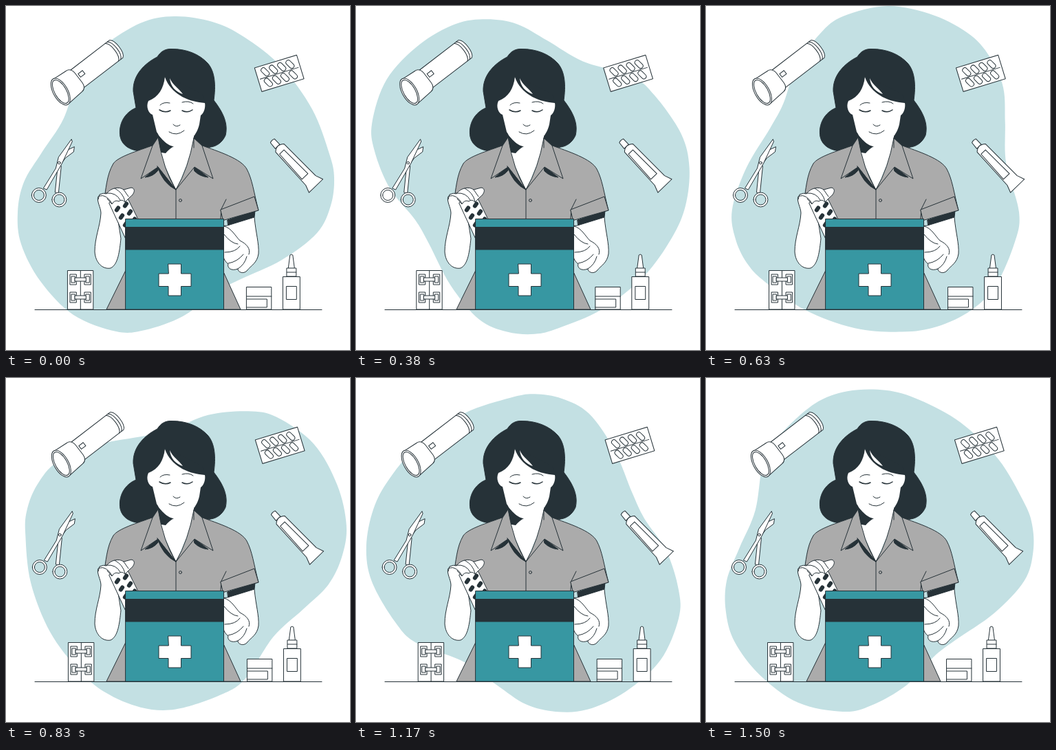
Recreate the animation shown at these times as an HTML page. Size 500 px wide and 500 px high, loop 1.54 s.

```html
<!DOCTYPE html>
<html lang="en">
<head>
<meta charset="utf-8">
<title>First aid kit</title>
<style>
  html, body { margin: 0; width: 100%; height: 100%; overflow: hidden; background: #fff; }
  svg { display: block; width: 100vw; height: 100vh; }
  .ink { fill: #fff; stroke: #263238; stroke-width: 1; stroke-linejoin: round; stroke-linecap: round; }
  .line { fill: none; }
  .dark { fill: #263238; }
  .gray { fill: #ababab; }
  .teal { fill: #3797a2; }
</style>
</head>
<body>
<svg viewBox="0 0 500 500">
  <path id="blob" fill="#c3e0e3"/>

  <g id="items" class="ink">
    <!-- flashlight -->
    <g transform="translate(79 124.500) rotate(-37.500)">
      <path d="M28-16H102C109-12 109 12 102 16H28Z"/>
      <path class="line" d="M94-16C101-11 101 11 94 16M98-16C105-11 105 11 98 16"/>
      <rect x="36" y="-5" width="8" height="6"/>
      <path d="M0-21L25-19C30-19 33-14 33-9V9C33 14 30 19 25 19L0 21Z"/>
      <g transform="rotate(8)">
        <ellipse rx="10.5" ry="21.5"/>
        <ellipse rx="8.5" ry="19"/>
      </g>
    </g>
    <!-- capsules -->
    <g transform="translate(361 90) rotate(-17)">
      <rect width="64" height="36"/>
      <path class="line" d="M3 18H61"/>
      <g id="capsules"></g>
    </g>
    <!-- tube -->
    <g transform="translate(387 196) rotate(46)">
      <path d="M11-4L0-4Q-2 0 0 4L11 5Z"/>
      <path d="M15-9L80-10L91-14V14L80 10L15 8Q7 0 15-9Z"/>
      <path class="line" d="M21-3L70-4V8L21 6Z"/>
    </g>
    <!-- scissors -->
    <path d="M75 232L71 271L76 272L80 233Z"/>
    <path d="M99 205L98 212L86 221L81 228L77 225L88 210Z"/>
    <path d="M95 194L96 197L81 229L59 267L54 265L72 236L76 220Z"/>
    <circle cx="77" cy="228" r="1.8"/>
    <g id="rings" fill-rule="evenodd"></g>
    <!-- box -->
    <path d="M89.5 384.5H126.500V441H89.500ZM108 384.500V441"/>
    <g id="clasps"></g>
    <!-- jar -->
    <path d="M349.500 408.500H385.500V441H349.500ZM349.500 422H385.500M349.500 426H379V438H349.500"/>
    <!-- dropper bottle -->
    <path d="M410 381L412.500 362Q414.500 360 416.500 362L419 381Z"/>
    <path d="M408 381H421.500V393H408ZM408 387H421.500M402.500 393.500H427V441H402.500ZM407.500 407.500H422V426.500H407.500Z"/>
  </g>

  <path class="ink" d="M42 441.500H459"/>

  <g class="ink">
    <!-- hair, neck and shirt -->
    <path class="dark" d="M240 62.500C231 62 224 67 220 74C202 83 184 100 185 124L189 148C172 155 163 172 166 190C169 204 182 210 196 211L250 220L279 203C296 209 312 204 319 188C324 168 312 150 302 137C305 116 304 95 293 83C281 70 262 62 240 62.500Z"/>
    <path d="M220 186V207L247 268L273 206V180Z" stroke="none"/>
    <path class="dark" d="M217 174L222 188Q233 202 244 204Q238 207 232 214L219 212Z" stroke="none"/>
    <path class="gray" d="M215 202C190 211 163 219 156 229C146 246 146 264 141 290L180 300V372L146 441H341L314 382V311L367 297C360 270 358 252 350 237C342 222 310 212 283 202L247 267Z"/>
    <path class="line" d="M247 267V309M312 309L313 295L320 281"/>
    <circle class="gray" cx="253.500" cy="282.500" r="2"/>
    <path class="dark" d="M221 233L202 249Q214 248 221 239ZM273 233L294 249Q282 248 274 240Z"/>
    <path class="gray" d="M221 191L213 203L196 251L221 234L247 267Q229 239 221 191Z"/>
    <path class="gray" d="M273 192L285 203L301 251L274 234L247 267Q265 236 273 192Z"/>
    <path class="dark" d="M220 233L247 267Q228 258 220 233Z"/>

    <!-- face -->
    <path d="M231 103C229 120 222 132 207 138C203 146 207 156 213 158L219 183C226 194 236 204 244 204C262 204 277 190 281 172L283 159C289 155 290 145 289 141C268 139 243 132 231 103Z" stroke="none"/>
    <path class="dark" d="M231 103C239 128 265 138 290 140L285 128L250 110Z" stroke="none"/>
    <path d="M238 105C239 117 247 125 257 128C251 119 243 116 238 105Z" stroke="none"/>
    <path class="line" d="M273 192V206M224 144Q229 139 238 141M256 140Q266 137 272 142M243 172Q247 177 253 173M237 183Q248 190 259 181"/>
    <path class="line" stroke-width="1.500" d="M223 151Q231 156 239 152M256 152Q264 156 271 151"/>

    <!-- right arm -->
    <path class="dark" d="M322 311L362 298L361 307L323 319Z"/>
    <path d="M322 319L361 307C363 330 368 345 367 360C365 374 356 377 350 385C345 390 337 387 337 382C327 386 321 380 323 375C316 370 314 360 314 350V320Z"/>
    <path class="line" d="M317 320C328 323 333 334 340 341C350 346 356 353 353 361M317 332Q327 345 337 346M323 374Q336 372 345 361M318 358Q334 358 340 349M337 382Q347 376 350 364"/>
    <path class="gray" d="M312 296L361 277L367 297L316 311.500Z"/>

    <!-- left arm with blister pack -->
    <path d="M134 277C131 283 138 293 138 301C137 320 129 336 129 357C130 374 141 383 152 381C163 376 165 356 167 338L162 306L152 284L146 272Z"/>
    <path d="M150 286L174 274L196 318L175 340Z"/>
    <g id="pills" class="dark"></g>
    <path d="M134 281L136 274Q142 271 146 273C152 264 165 262 171 267L182 264C189 265 187 273 180 278L173 285Q168 280 164 284Q158 281 154 288L147 280"/>
    <path class="line" d="M136 276Q146 273 154 287M147 272Q160 271 166 282M158 265Q170 271 173 284M171 267L178 277"/>

    <!-- bag -->
    <path class="teal" d="M174 309.500H316.500V441H174Z"/>
    <path class="dark" d="M174 321.500H316.500V354H174Z"/>
    <path d="M236 375H254.500V389H269V407.500H254.500V421H236V407.500H222V389H236Z"/>
  </g>
</svg>
<script>
const LOOP = 1540, STEPS = 37;
const $ = id => document.getElementById(id);
const repeat = (n, make) => Array.from({ length: n }, (_, i) => make(i)).join('');

$('capsules').innerHTML = repeat(8, i => {
  const x = 13 + (i % 4) * 12.600, y = i < 4 ? 10 : 26;
  return `<rect x="-7" y="-3.500" width="14" height="7" rx="3.500" transform="translate(${x} ${y}) rotate(62)"/>`;
});
$('rings').innerHTML = repeat(2, i => {
  const circle = r => `m${-r} 0a${r} ${r} 0 1 0 ${2 * r} 0a${r} ${r} 0 1 0 ${-2 * r} 0`;
  const center = `M${47.5 + i * 29.500} ${275 + i * 6.500}`;
  return `<path d="${center}${circle(10.5)}${center}${circle(7.5)}"/>`;
});
$('clasps').innerHTML = repeat(2, i => {
  const y = 390 + i * 26;
  const plate = x => `<path d="M${x} ${y}h9v15h-9zM${x + 2} ${y + 3}h5v9h-5z"/>`;
  return plate(93) + plate(114) + `<rect x="100" y="${y + 5}" width="16" height="5"/>`;
});
$('pills').innerHTML = repeat(8, i => {
  const row = i >> 1, side = i % 2;
  const x = 162 + row * 6 + side * 12, y = 295 + row * 11 - side * 6;
  return `<rect x="-4.500" y="-2.500" width="9" height="5" rx="2.500" transform="translate(${x} ${y}) rotate(-55)"/>`;
});

// Closed Catmull-Rom curve through the given points
function smooth(pts) {
  const at = i => pts[(i + pts.length) % pts.length];
  const handle = (i, k) => at(i).map((v, d) => v + k * (at(i + 1)[d] - at(i - 1)[d]) / 6);
  return `M${pts[0]}` + pts.map((_, i) =>
    `C${handle(i, 1)} ${handle(i + 1, -1)} ${at(i + 1)}`).join('') + 'Z';
}
$('blob').setAttribute('d', smooth([
  [245, 15], [300, 23], [346, 45], [400, 88], [445, 150], [470, 215], [477, 250],
  [472, 290], [452, 330], [401, 369], [339, 398], [303, 417], [257, 451], [202, 471],
  [160, 473], [98, 449], [50, 400], [22, 346], [17, 300], [26, 256], [52, 213],
  [84, 163], [108, 94], [138, 61], [195, 25]
]));

const SHAKE = [0, -1, 2, -4, 4, -4, 4, -4, 2, -1, 0];
function shake(phase) {
  const p = (phase % 1) * 10, i = Math.floor(p);
  return SHAKE[i] + (SHAKE[i + 1] - SHAKE[i]) * (p - i);
}

const start = performance.now();
function draw() {
  // Motion advances in even steps at about 24 per second
  const time = (performance.now() - start) % LOOP + 5;
  const phase = Math.floor(time / LOOP * STEPS) / STEPS;
  $('blob').setAttribute('transform', `rotate(${phase * 360} 250 250)`);
  $('items').setAttribute('transform', `translate(${shake(phase + 0.02) + 0.5} 0)`);
  requestAnimationFrame(draw);
}
draw();
</script>
</body>
</html>
```
